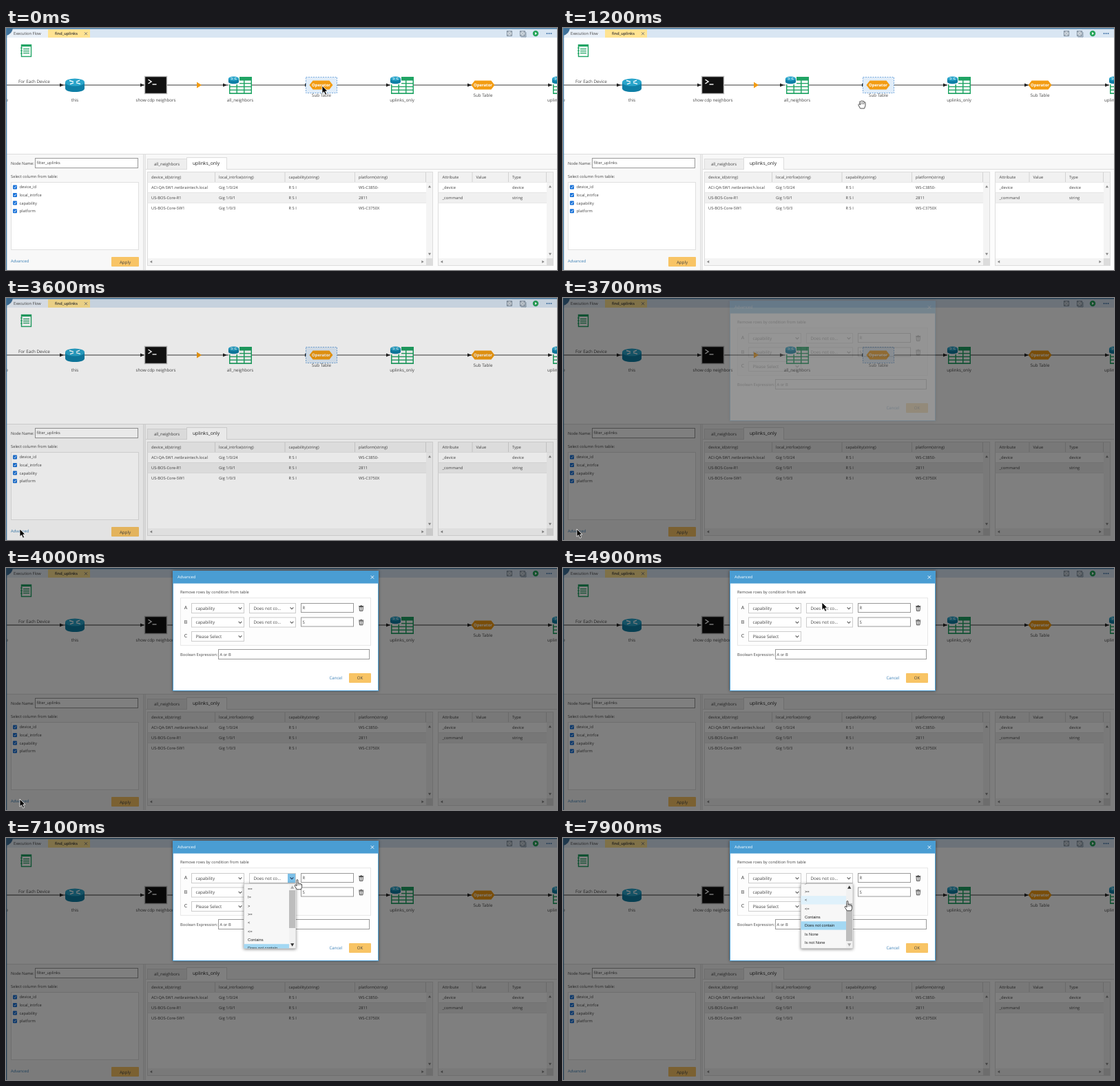
Write an HTML page that moves like this. It is 800x352 px and loops after 8 s.

```html
<!DOCTYPE html>
<html lang="en">
<head>
<meta charset="utf-8">
<title>Filter rows in a flow</title>
<style>
html, body { margin: 0; width: 100%; height: 100%; overflow: hidden; background: #fff; }
svg { display: block; width: 800px; height: 352px; }
text { font-family: "Open Sans", sans-serif; text-rendering: geometricPrecision; white-space: pre; }
#list text { font-family: "Liberation Sans", Arial, sans-serif; }
</style>
</head>
<body>
<svg id="stage" viewBox="0 0 800 352" xmlns="http://www.w3.org/2000/svg"></svg>
<script>
const INK = '#444', BLUE = '#4a9dd3', LINK = '#3a7fb5', AMBER = '#f8c465', ORANGE = '#f39c12', GREEN = '#20a464';

// Shape helpers return SVG markup
const rect = (x, y, w, h, fill, more = '') =>
  `<rect x="${x}" y="${y}" width="${w}" height="${h}" fill="${fill}" ${more}/>`;
const box = (x, y, w, h, fill, line, more = '') =>
  rect(x + .5, y + .5, w - 1, h - 1, fill, `stroke="${line}" ${more}`);
const path = (d, fill = 'none', more = '') => `<path d="${d}" fill="${fill}" ${more}/>`;
const line = (d, color, width = 1) => path(d, 'none', `stroke="${color}" stroke-width="${width}"`);
const esc = s => s.replace(/&/g, '&amp;').replace(/</g, '&lt;');
// y is the middle of the lower-case letters
const text = (x, y, s, size = 5.75, fill = INK, more = '') =>
  `<text x="${x}" y="${y + size * .36}" font-size="${size}" fill="${fill}" ${more}>${esc(s)}</text>`;
const label = (x, y, s, size = 6.2, fill = INK, more = '') =>
  text(x, y, s, size, fill, 'text-anchor="middle" ' + more);
const at = (x, y, s, scale = 1) => `<g transform="translate(${x} ${y}) scale(${scale})">${s}</g>`;
const triangle = (x, y, angle, fill = '#888', r = 1.7) =>
  `<path transform="translate(${x} ${y}) rotate(${angle})" d="M0 ${-r}L${r * 1.2} ${r}H${-r * 1.2}z" fill="${fill}"/>`;

const router =
  path('M-14-4V5C-14 8-8 10 0 10S14 8 14 5V-4z', '#0f7fa6') +
  '<ellipse cy="-4" rx="14" ry="5.6" fill="#2aa5cb"/>' +
  line('M-8-6.5L-2-4.8M2-3.4L8-1.6M7-6.8L2-4.8M-2-3.2L-7-1.4', '#fff', 1.3);

function tableIcon() {
  let s = rect(-16, -12, 33, 25, GREEN);
  for (let row = 0; row < 4; row++)
    for (let col = 0; col < 3; col++)
      s += rect(-14.5 + col * 10.5, -6.5 + row * 4.8, 9, 3.4, '#fff');
  return s + rect(-18, -14, 17, 13, '#fff') + at(-9.5, -7.2, router, .54);
}

const consoleIcon = box(-16.5, -13, 33, 26, '#111', '#bbb', 'stroke-width="1.4"') +
  line('M-11-8L-6.5-5L-11-2', '#fff', 1.5) + line('M-5-1H1', '#fff', 1.4);

const operator = path('M-17 0L-12-6.5H12L17 0L12 6.5H-12z', ORANGE) +
  label(0, -.1, 'Operator', 5.9, '#fff', 'font-weight="700"');

function flow() {
  let s = line('M0 83H800', '#222', .9);
  for (const x of [84, 201, 321, 440, 558, 676, 793]) s += path(`M${x} 83l-6-2.6v5.2z`, '#222');
  s += path('M277 78.5l7 4.5l-7 4.5z', ORANGE);
  s += rect(86, 74, 28, 19, '#fff') + at(100, 83, router) + at(217.5, 83, consoleIcon);
  for (const x of [340, 575, 810]) s += rect(x - 17, 70, 34, 26, '#fff') + at(x, 83, tableIcon());
  s += box(435, 71, 46, 24, '#e1edf9', '#76a9dc', 'stroke-dasharray="2 1.5"');
  s += at(457.5, 83, operator) + at(692.5, 83, operator);
  s += text(18, 77.3, 'For Each Device', 6.25) + text(-.5, 104.3, 'e', 6.2) + text(786, 104.3, 'uplinks', 6.2);
  const names = [[100, 'this'], [217.5, 'show cdp neighbors'], [340, 'all_neighbors'], [575, 'uplinks_only']];
  for (const [x, name] of names) s += label(x, 104.3, name);
  return s + label(458, 98.2, 'Sub Table') + label(692.5, 98.2, 'Sub Table');
}

function topBar() {
  const disk = box(-4, -4, 8, 8, '#eef3f8', '#678', 'stroke-width=".8"') + line('M-2-3.5V-1H2V-3.5M-2 3.5V1H2V3.5', '#678', .7);
  let s = rect(0, 0, 800, 14, '#d9e6f3') + rect(0, 0, 800, 1.5, '#4a7fa8');
  s += rect(2, 2, 59, 12, '#e8eff7') + rect(61, 2, 61, 12, '#ffe392');
  s += text(11, 8.2, 'Execution Flow') + text(71, 8.2, 'find_uplinks', 5.65, '#333', 'font-weight="600"');
  s += line('M114 6.2l4 4m0-4l-4 4', '#777', .9);
  s += at(731, 8, disk) + at(750, 8, disk) + line('M747.5 13h7.5v-7', '#678', .7);
  s += '<circle cx="769" cy="8" r="4.2" fill="#27a55b"/>' + path('M768 6l3 2l-3 2z', '#fff');
  for (const x of [785.5, 788.5, 791.5]) s += `<circle cx="${x}" cy="8" r="1" fill="#3a6ea5"/>`;
  return s + path('M0 0H10Q9 9 0 11z', '#3f7199');
}

function sheetIcon() {
  let s = box(22, 24, 15, 18, '#fff', GREEN, 'stroke-width="1.4"') + rect(22, 24, 15, 3, GREEN);
  for (const y of [30.5, 33.5, 36.5]) s += line(`M25 ${y}h9`, GREEN, 1.3);
  return s + line('M21 29h3m-3 4h3m-3 4h3', GREEN);
}

function leftPanel() {
  let s = text(7, 196.5, 'Node Name:') + box(42, 189, 150, 15, '#fff', '#999') + text(44.5, 196.3, 'filter_uplinks');
  s += text(7, 216, 'Select column from table:') + box(7, 224, 186, 99, '#fff', '#e0e0e0');
  ['device_id', 'local_intrfce', 'capability', 'platform'].forEach((name, i) => {
    const y = 231.3 + i * 11.6;
    s += rect(10, y - 2.9, 6, 6, '#1a73d9', 'rx="1"') + line(`M11.4 ${y}l1.3 1.4l2.2-2.7`, '#fff', .9);
    s += text(19.5, y, name);
  });
  return s + text(7, 338.5, 'Advanced', 5.75, LINK) + button(153, 333, 40, 14, 'Apply', 6.2);
}

const button = (x, y, w, h, name, size) =>
  rect(x, y, w, h, AMBER, 'rx="1"') + label(x + w / 2, y + h / 2 + .3, name, size);

function grid(x, w, starts, rows) {
  const end = x + w;
  let s = box(x, 209, w, 137, '#fff', '#ddd') + rect(x + 1, 210, w - 2, 14, '#f1f1f1');
  s += rect(x + 1, 239, w - 11, 15, '#f0f0f0') + line(`M${x} 224.5H${end}M${x} 239.5H${end - 10}M${x} 254.5H${end - 10}`, '#e3e3e3', .8);
  s += rect(end - 10, 225, 9, 111, '#f4f4f4') + rect(x + 1, 335, w - 2, 10, '#f4f4f4') + rect(end - 10, 335, 9, 10, '#dcdcdc');
  for (const c of [...starts.slice(1), end - 5]) s += line(`M${c - 5.5} 210V224`, '#ccc', .8);
  rows.forEach((row, i) => row.forEach((cell, j) => {
    s += text(starts[j], 216.8 + i * 14.8 + (i ? .3 : 0), cell);
  }));
  s += triangle(end - 5, 230.5, 0) + triangle(end - 5, 329, 180);
  return s + triangle(x + 5.5, 340, -90) + triangle(end - 15, 340, 90);
}

function lowerPanel() {
  let s = rect(0, 183, 800, 169, '#f8f8f8') + line('M0 183.5H800', '#ddd');
  s += rect(199, 184, 3, 168, '#ececec') + line('M199.5 184V352M202.5 184V352', '#ddd', .7);
  s += box(205, 190, 58, 16, '#eee', '#ddd') + rect(203, 205, 597, 147, '#fcfcfc') + line('M203 205.5H800', '#ddd');
  s += box(262, 188, 59, 18, '#fff', '#ddd') + rect(263, 204, 57, 3, '#fff');
  s += label(233.5, 197.7, 'all_neighbors', 6) + label(290.5, 196.7, 'uplinks_only', 6.8, '#222');
  s += grid(205, 415, [211, 309, 410.5, 512], [
    ['device_id(string)', 'local_intrfce(string)', 'capability(string)', 'platform(string)'],
    ['ACI-QA-SW1.netbraintech.local', 'Gig 1/0/24', 'R S I', 'WS-C3850-'],
    ['US-BOS-Core-R1', 'Gig 1/0/1', 'R S I', '2811'],
    ['US-BOS-Core-SW1', 'Gig 1/0/3', 'R S I', 'WS-C3750X']]);
  s += grid(627, 168, [633.5, 682.5, 735], [
    ['Attribute', 'Value', 'Type'], ['_device', '', 'device'], ['_command', '', 'string']]);
  return s + leftPanel();
}

const chevron = (x, y, color) => line(`M${x - 2.3} ${y - 1.2}l2.3 2.5l2.3-2.5`, color, 1.1);
const select = (x, y, w, name) => box(x, y, w, 15, '#fff', '#ccc') +
  text(x + 6.5, y + 7.6, name, 6.25) + chevron(x + w - 6, y + 7.5, '#555');

function dialog() {
  let s = rect(242, 4, 299, 175, '#fff', 'style="filter:drop-shadow(0 0 2px #0007)"');
  s += box(242, 4, 299, 175, '#fff', BLUE) + rect(242, 4, 299, 18.5, BLUE);
  s += text(249, 13.2, 'Advanced', 5.75, '#fff') + line('M529.7 11.2l4.4 4.4m0-4.4l-4.4 4.4', '#fff', .9);
  s += text(253, 35.3, 'Remove rows by condition from table') + box(253, 43, 277, 70, '#fdfdfd', '#e8e8e8');
  ['A', 'B', 'C'].forEach((name, i) => {
    const y = 51 + i * 20.5;
    s += label(261, y + 6.5, name, 7, '#333') + select(269, y, 77, i < 2 ? 'capability' : 'Please Select');
    if (i > 1) return;
    s += select(353, y, 68, 'Does not co...') + box(428, y, 77, 14, '#fff', '#999') + text(430.5, y + 7, 'RS'[i], 6);
    s += path(`M513 ${y + 5.5}h5.4l-.5 5.8h-4.4z`, '#fff', 'stroke="#444"') + line(`M512 ${y + 4.6}h7.4M514.5 ${y + 3.7}h2.4M515.7 ${y + 6}v4.5`, '#444', .9);
  });
  s += text(253, 125.5, 'Boolean Expression:') + box(308, 118, 220, 15, '#fff', '#999') + text(310.5, 125.6, 'A or B');
  return s + text(469.5, 160, 'Cancel', 6.1, LINK) + button(498, 153, 32, 14, 'OK', 6.1);
}

const ITEM = 12.35, LIST_TOP = 67.8, SCROLL = 33;
const conditions = ['==', '!=', '>', '>=', '<', '<=', 'Contains', 'Does not contain', 'Is None', 'Is not None'];
const list = rect(345, 66, 76, 95, '#f7f7f7', 'style="filter:drop-shadow(0 1px 2px #0007)"') +
  box(345, 66, 76, 95, '#f7f7f7', '#ccc') +
  '<g clip-path="url(#view)"><g id="items">' + rect(345, LIST_TOP + 7 * ITEM, 66, ITEM, '#a3d8f3') +
  `<rect id="hover" x="345" width="66" height="${ITEM}" fill="#dff1fb"/>` +
  conditions.map((s, i) => text(351, LIST_TOP + (i + .5) * ITEM, s, 5.75, '#222')).join('') + '</g></g>' +
  rect(411, 67, 9.5, 93, '#f1f1f1') + '<rect id="thumb" x="411" width="9" height="55" fill="#bdbdbd"/>' +
  '<g id="up">' + triangle(415.7, 71.5, 0, 'inherit', 2.2) + '</g><g id="down">' + triangle(415.7, 155.5, 180, 'inherit', 2.2) + '</g>';

const outline = 'stroke="#fff" stroke-width=".8" stroke-linejoin="round"';
const inked = 'stroke="#222" stroke-width=".8" stroke-linejoin="round"';
const cursors = {
  arrow: path('M0 0V11.2L2.6 8.8L4.6 13.2L6.6 12.3L4.7 8H8z', '#000', outline),
  grab: path('M-2.5 6L-5.2.8Q-4.6-1-3-.2L-2.4.8L-3.6-3.6Q-2.6-5.4-1.6-3.6L-.8-4.8Q.3-6.2 1.2-4.5Q2.8-5.4 3.3-3.4Q5-3.8 5 -1.8V2L3.6 6z', '#fff', inked) +
    line('M-1.5-3.5L-.8 0M1.1-4.3V0M3.2-3.3L2.9 0', '#222', .6),
  hand: path('M-1 0Q.2-1 1 .3V5Q2.4 4 3 5.4Q4.4 4.6 5 6Q6.4 5.6 6.6 7V10.5L5.4 13.8H-.6L-4 8.4Q-3.6 6.6-2 7.7L-1 8.8z', '#fff', inked) +
    line('M1 5V8M3 5.5V8M5 6V8.2', '#222', .5)
};

const group = (id, s) => `<g id="${id}">${s}</g>`;
const $ = id => document.getElementById(id);
$('stage').innerHTML = '<clipPath id="view"><rect x="345.5" y="66.5" width="75" height="94"/></clipPath>' +
  rect(0, 0, 800, 352, '#fff') + topBar() + sheetIcon() + flow() + lowerPanel() + rect(0, 0, 1.3, 352, '#4a7fa8') +
  group('shade', rect(0, 0, 800, 352, '#000')) + group('dialog', dialog()) +
  group('hot', rect(409, 52, 11, 13, '#7cc0e8') + chevron(415, 58.5, '#235')) + group('list', list) +
  group('cursor', Object.entries(cursors).map(([id, s]) => group(id, s)).join(''));

// Pointer stops: time, x, y
const stops = [[0, 459, 84], [450, 459, 84], [800, 411, 140], [1000, 411, 140], [1200, 434, 111], [1900, 434, 111],
  [2900, 20, 336], [4100, 20, 336], [4800, 376, 50], [5500, 376, 50], [6000, 417, 59], [6700, 417, 59],
  [7000, 423, 61], [7200, 423, 61], [7450, 414, 76], [7800, 413, 92], [8000, 413, 92]];
const ramp = (t, a, b) => Math.min(1, Math.max(0, (t - a) / (b - a)));
const ease = k => k * k * (3 - 2 * k);
const show = (id, on) => $(id).setAttribute('display', on ? 'inline' : 'none');
const set = (id, name, value) => $(id).setAttribute(name, value);

function pointer(t) {
  const i = stops.findIndex(s => s[0] > t);
  const [t0, x0, y0] = stops[i - 1], [t1, x1, y1] = stops[i];
  const k = ease(ramp(t, t0, t1));
  return [x0 + (x1 - x0) * k, y0 + (y1 - y0) * k];
}

function draw(t) {
  const [x, y] = pointer(t);
  const kind = t > 5800 ? 'hand' : t > 600 && t < 3000 && y < 183 ? 'grab' : 'arrow';
  for (const id in cursors) show(id, id === kind);
  set('cursor', 'transform', `translate(${x} ${y})`);

  set('shade', 'opacity', .5 * ramp(t, 3580, 3700));
  set('dialog', 'opacity', ramp(t, 3650, 3950));

  // The list follows the dragged scroll thumb
  const scroll = t > 7200 ? ramp(y, 76, 92) : 0;
  show('hot', t >= 5850 && y < 66);
  show('list', t >= 6300);
  set('items', 'transform', `translate(0 ${-SCROLL * scroll})`);
  set('thumb', 'y', 76 + 19 * scroll);
  set('up', 'fill', scroll > 0 ? '#333' : '#aaa');
  set('down', 'fill', scroll < 1 ? '#333' : '#aaa');
  show('hover', scroll === 1);
  set('hover', 'y', LIST_TOP + Math.floor((y - LIST_TOP + SCROLL) / ITEM) * ITEM);
}

const start = performance.now();
function tick() {
  draw((performance.now() - start) % 8000);
  requestAnimationFrame(tick);
}
tick();
</script>
</body>
</html>
```
